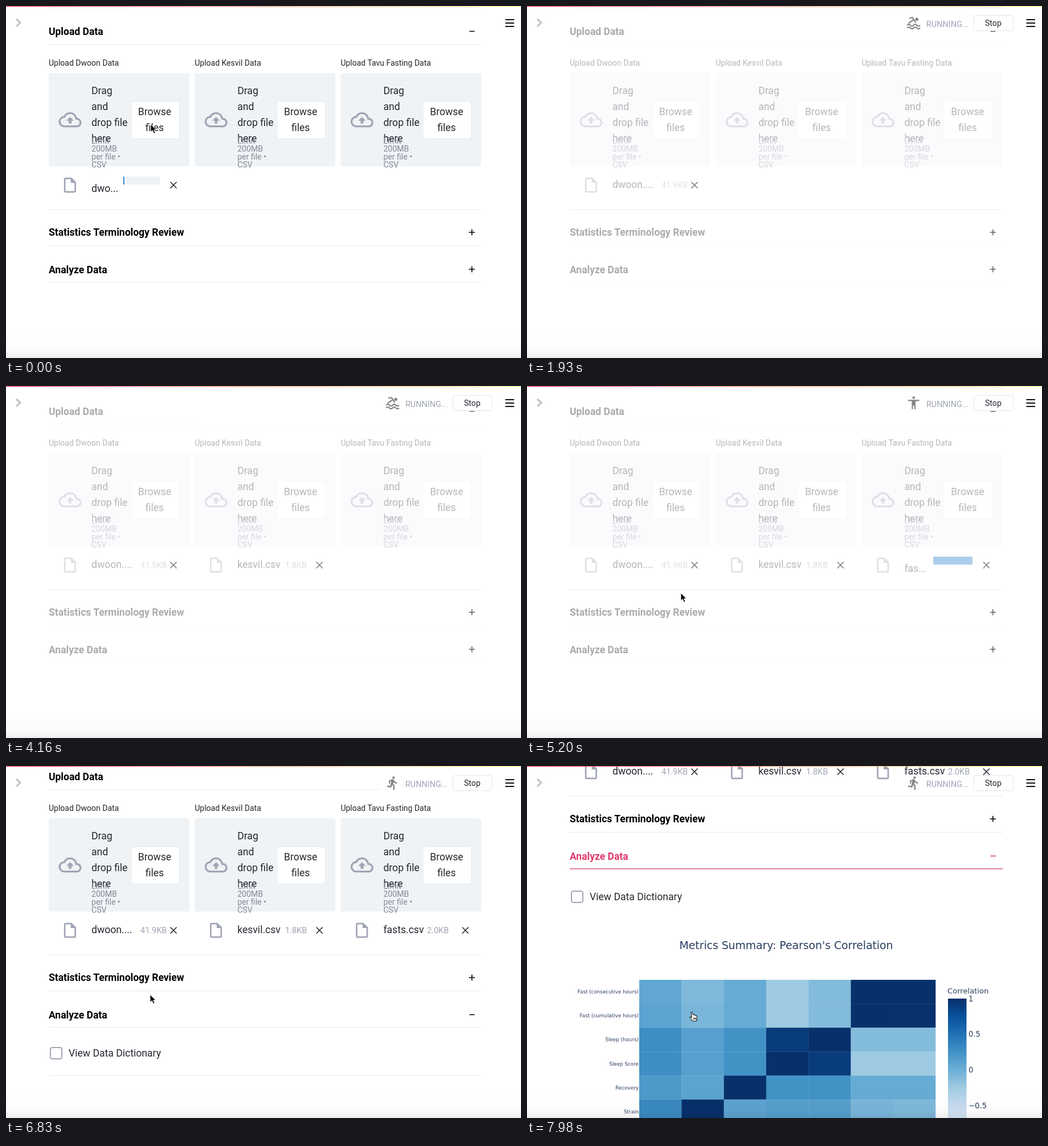
Write an HTML page that moves like this. It is 904x619 px and loops after 8 s.

```html
<!DOCTYPE html>
<html lang="en">
<head>
<meta charset="utf-8">
<title>Upload and analyze</title>
<style>
html, body { margin: 0; width: 100%; height: 100%; overflow: hidden; background: #fff; }
svg { display: block; width: 904px; height: 619px; }
text { font-family: Roboto, "Liberation Sans", sans-serif; white-space: pre; }
.plot text { font-family: "DejaVu Sans", sans-serif; fill: #2a3f5f; }
.line { fill: none; stroke: #e6e8ec; stroke-width: 1; }
.mark { fill: none; stroke: currentColor; stroke-width: 1.6; }

.stale { animation: stale 8s linear infinite; }
.dim { animation: dim 8s linear infinite; }
@keyframes stale {
  0% { opacity: 1 }
  9% { opacity: 1; animation-timing-function: ease-in }
  21.5%, 67.37% { opacity: .33 }
  67.38%, 100% { opacity: 1 }
}
@keyframes dim {
  0% { opacity: 1 }
  9% { opacity: 1; animation-timing-function: ease-in }
  21.5%, 67.37% { opacity: .6 }
  67.38%, 100% { opacity: 1 }
}

#page { animation: scroll 8s step-end infinite; }
@keyframes scroll {
  0% { transform: translateY(0) }
  83.1% { transform: translateY(-9px) }
  84.2% { transform: translateY(-19px) }
  85.3% { transform: translateY(-26px) }
  89% { transform: translateY(-34px) }
  90.2% { transform: translateY(-48px) }
  94.85% { transform: translateY(-57px) }
  97.35% { transform: translateY(-155px) }
  98.6% { transform: translateY(-245px) }
  99.7%, 100% { transform: translateY(-305px) }
}

/* hard on/off switches */
#busy0 { animation: busy0 8s step-end infinite; }
#done0 { animation: done0 8s step-end infinite; }
#busy1 { animation: busy1 8s step-end infinite; }
#done1 { animation: done1 8s step-end infinite; }
#row1 { animation: row1 8s step-end infinite; }
#busy2 { animation: busy2 8s step-end infinite; }
#done2 { animation: done2 8s step-end infinite; }
#row2 { animation: row2 8s step-end infinite; }
#status { animation: status 8s step-end infinite; }
#closed { animation: closed 8s step-end infinite; }
.open { animation: open 8s step-end infinite; }
#tail { animation: tail 8s step-end infinite; }
#plot { animation: plot 8s step-end infinite; }
#check { animation: check 8s step-end infinite; }
#analyze { animation: hover 8s step-end infinite; }
#glow { animation: glow 8s step-end infinite; }
@keyframes busy0 { 0% { visibility: visible } 1.24%, 100% { visibility: hidden } }
@keyframes done0 { 0% { visibility: hidden } 1.24%, 100% { visibility: visible } }
@keyframes row1 { 0% { opacity: 0 } 30.36%, 100% { opacity: 1 } }
@keyframes busy1 { 0% { visibility: visible } 37.35%, 100% { visibility: hidden } }
@keyframes done1 { 0% { visibility: hidden } 37.35%, 100% { visibility: visible } }
@keyframes row2 { 0% { opacity: 0 } 58%, 100% { opacity: 1 } }
@keyframes busy2 { 0% { visibility: visible } 66.1%, 100% { visibility: hidden } }
@keyframes done2 { 0% { visibility: hidden } 66.1%, 100% { visibility: visible } }
@keyframes status { 0% { visibility: hidden } 3.6% { visibility: visible } 72.2% { visibility: hidden } 77.1%, 100% { visibility: visible } }
@keyframes closed { 0% { visibility: visible } 80.7%, 100% { visibility: hidden } }
@keyframes open { 0% { visibility: hidden } 80.7%, 100% { visibility: visible } }
@keyframes tail { 0% { visibility: hidden } 80.7% { visibility: visible } 89%, 100% { visibility: hidden } }
@keyframes plot { 0% { visibility: hidden } 89%, 100% { visibility: visible } }
@keyframes check { 0% { transform: none } 89%, 100% { transform: translateY(4px) } }
@keyframes hover { 0% { color: #000 } 68.4% { color: #e23a6a } 80.7% { color: #000 } 91.3%, 100% { color: #e23a6a } }
@keyframes glow { 0% { opacity: 0 } 68.4% { opacity: 1 } 80.7% { opacity: 0 } 91.3%, 100% { opacity: 1 } }

#fill1, #fill2 { transform-box: fill-box; }
#fill1 { animation: fill1 8s linear infinite; }
#fill2 { animation: fill2 8s linear infinite; }
@keyframes fill1 { 0%, 30.3% { transform: scaleX(.03) } 33.9%, 100% { transform: none } }
@keyframes fill2 { 0%, 58% { transform: scaleX(.03) } 62%, 100% { transform: none } }

#cursor { animation: move 8s linear infinite, show 8s step-end infinite; }
@keyframes move {
  0%, 3.5% { transform: translate(254px, 208px) }
  6% { transform: translate(134px, 385px) }
  6.1%, 27.8% { transform: translate(473px, 226px) }
  34.9%, 36.1% { transform: translate(150px, 174px) }
  38.6% { transform: translate(11px, 118px) }
  41.1%, 42.2% { transform: translate(8px, 88px) }
  42.3%, 57% { transform: translate(640px, 236px) }
  59.2%, 61.5% { transform: translate(223px, 310px) }
  64.9%, 66.1% { transform: translate(270px, 364px) }
  68.4%, 78.3% { transform: translate(284px, 470px) }
  80.7% { transform: translate(272px, 436px) }
  85.3%, 89% { transform: translate(253px, 402px) }
  91.3%, 100% { transform: translate(285px, 432px) }
}
@keyframes show { 0% { opacity: 1 } 6% { opacity: 0 } 27.8% { opacity: 1 } 42.2% { opacity: 0 } 57%, 100% { opacity: 1 } }
#arrow { animation: arrow 8s step-end infinite; }
#beam { animation: beam 8s step-end infinite; }
#hand { animation: hand 8s step-end infinite; }
@keyframes arrow { 0% { visibility: visible } 33.6% { visibility: hidden } 36.3% { visibility: visible } 68.4% { visibility: hidden } 80.7% { visibility: visible } 91.3%, 100% { visibility: hidden } }
@keyframes beam { 0% { visibility: hidden } 33.6% { visibility: visible } 36.3%, 100% { visibility: hidden } }
@keyframes hand { 0% { visibility: hidden } 68.4% { visibility: visible } 80.7% { visibility: hidden } 91.3%, 100% { visibility: visible } }
</style>
</head>
<body>
<svg id="stage" viewBox="0 0 904 619"></svg>
<script>
const INK = '#262730', PALE = '#eff3f6', MUTED = '#a0a5b5', BODY = 17.6, STEP = 256.2;

// text placed by the middle of its capitals
const text = (x, y, str, size = BODY, fill = INK, more = '') =>
  `<text x="${x}" y="${y + size * .36}" font-size="${size}" fill="${fill}" ${more}>${str}</text>`;
const rect = (x, y, w, h, fill, more = '') =>
  `<rect x="${x}" y="${y}" width="${w}" height="${h}" fill="${fill}" ${more}/>`;
const rule = (y, more = 'class="line"') => `<path d="M75 ${y}H835" ${more}/>`;
const heading = (y, str, fill = '#000') => text(75, y, str, 17.5, fill, 'font-weight="600"');
const minus = y => `<path class="mark" d="M813.5 ${y}h9"/>`;
const plus = y => `<path class="mark" d="M812.5 ${y}h10.5M817.8 ${y - 5.3}v10.6"/>`;

const CLOUD = 'M19.35 10.04C18.67 6.59 15.64 4 12 4 9.11 4 6.6 5.64 5.35 8.04 2.34 8.36 0 10.91 0 14c0 3.31 2.69 6 6 6h13c2.76 0 5-2.24 5-5 0-2.64-2.05-4.78-4.65-4.96zM19 18H6c-2.21 0-4-1.79-4-4 0-2.05 1.53-3.76 3.56-3.97l1.07-.11.5-.95C8.08 7.14 9.94 6 12 6c2.62 0 4.88 1.86 5.39 4.43l.3 1.5 1.53.11c1.56.1 2.78 1.41 2.78 2.96 0 1.65-1.35 3-3 3zM8 13h2.55v3h2.9v-3H16l-4-4z';
const SHEET = 'M14 2H6c-1.1 0-2 .9-2 2v16c0 1.1.9 2 2 2h12c1.1 0 2-.9 2-2V8l-6-6zM6 20V4h7v5h5v11H6z';

const columns = [
  { label: 'Dwoon', short: 'dwo...', file: 'dwoon....', size: '41.9KB', sizeX: 236, bar: [206, 64], part: 1.5 },
  { label: 'Kesvil', short: 'kes...', file: 'kesvil.csv', size: '1.8KB', sizeX: 490, bar: [459, 56] },
  { label: 'Tavu Fasting', short: 'fas...', file: 'fasts.csv', size: '2.0KB', sizeX: 739, bar: [713, 69] }
];

function uploader(c, i) {
  const x = 75 + STEP * i, tx = x + 75, mid = x + 186;
  return text(x, 100, `Upload ${c.label} Data`, 14)
    + rect(x, 118, 247, 164, PALE, 'rx="4"')
    + `<path fill="${MUTED}" transform="translate(${x + 17.5} 180) scale(1.667)" d="${CLOUD}"/>`
    + ['Drag', 'and', 'drop file', 'here'].map((s, n) => text(tx, 149 + 28 * n, s)).join('')
    + ['Limit', '200MB', 'per file •', 'CSV'].map((s, n) => text(tx, 237 + 14 * n, s, 14.1, '#858896')).join('')
    + rect(x + 144.5, 168, 85, 65.5, '#fff', 'rx="4" stroke="#e6e9ef"')
    + text(mid, 186, 'Browse', BODY, INK, 'text-anchor="middle"')
    + text(mid, 214, 'files', BODY, INK, 'text-anchor="middle"');
}

function fileRow(c, i) {
  const x = 75 + STEP * i, [bx, bw] = c.bar, cx = x + 219;
  return `<g id="row${i}"><g class="stale">
    <path fill="${MUTED}" transform="translate(${x + 21.5} 299.2) scale(1.32)" d="${SHEET}"/>
    <g id="busy${i}">${text(x + 75, 321, c.short)}${rect(bx, 300, bw, 14, PALE, 'rx="2"')}
      ${rect(bx, 300, c.part || bw, 14, '#0068c9', `id="fill${i}" rx="${c.part ? 0 : 2}"`)}</g>
    <g id="done${i}">${text(x + 75, 314, c.file)}${text(c.sizeX, 315, c.size, 14.5, MUTED)}</g>
    </g><path class="mark dim" color="${INK}" d="M${cx - 5.5} 309.5l11 11m0-11l-11 11"/></g>`;
}

const blues = ['247,251,255', '222,235,247', '198,219,239', '158,202,225', '107,174,214',
  '66,146,198', '33,113,181', '8,81,156', '8,48,107'].map(s => s.split(',').map(Number));
function blue(z) {
  const p = (z + 1) * 4, i = Math.min(7, Math.floor(p));
  return `rgb(${blues[i].map((v, k) => Math.round(v + (blues[i + 1][k] - v) * (p - i)))})`;
}
const metrics = [
  ['Fast (consecutive hours)', .06, -.1, .03, -.25, -.12, 1, 1],
  ['Fast (cumulative hours)', .1, -.07, .03, -.25, -.12, 1, .99],
  ['Sleep (hours)', .28, .13, .25, .91, 1, -.12, -.12],
  ['Sleep Score', .28, .13, .25, 1, .91, -.25, -.25],
  ['Recovery', .18, .09, 1, .25, .25, .03, .03],
  ['Strain', .31, 1, .09, .13, .13, -.07, -.1]
];

function plot() {
  const w = 520 / 7, h = 42.1, top = 681;
  const rows = metrics.map(([name, ...zs], r) =>
    text(196, top + h * (r + .5), name, 8.78, '#2a3f5f', 'text-anchor="end"')
    + zs.map((z, c) => rect(197 + w * c, top + h * r, w + .3, h + .3, blue(z))).join('')).join('');
  const stops = blues.map((c, i) => `<stop offset="${1 - i / 8}" stop-color="rgb(${c})"/>`).reverse().join('');
  const ticks = ['1', '0.5', '0', '−0.5'].map((s, i) => text(775, 714 + 62.6 * i, s, 13.2)).join('');
  return `<g id="plot" class="plot">
    <linearGradient id="scale" x2="0" y2="1">${stops}</linearGradient>
    ${text(455, 620.5, "Metrics Summary: Pearson's Correlation", 18.8, '', 'text-anchor="middle"')}
    ${rows}${text(738, 700.5, 'Correlation', 13.1)}${rect(739, 714, 32.5, 250, 'url(#scale)')}${ticks}</g>`;
}

const stroke = 'fill="none" stroke="#858585" stroke-width="2"';
const figures = {
  run: '<path d="M13.49 5.48c1.1 0 2-.9 2-2s-.9-2-2-2-2 .9-2 2 .9 2 2 2zm-3.6 13.9l1-4.4 2.1 2v6h2v-7.5l-2.1-2 .6-3c1.3 1.5 3.3 2.5 5.5 2.5v-2c-1.9 0-3.5-1-4.3-2.4l-1-1.6c-.4-.6-1-1-1.7-1-.3 0-.5.1-.8.1l-5.2 2.2v4.7h2v-3.4l1.8-.7-1.6 8.1-4.9-1-.4 2 7 1.4z"/>',
  stand: '<path d="M12 1.5a2.1 2.1 0 1 1 0 4.2 2.1 2.1 0 0 1 0-4.2zM21 9h-6v13h-2v-6h-2v6H9V9H3V7h18z"/>',
  swim: `<circle cx="17" cy="6.3" r="2.5"/><path ${stroke} d="M5 4.5l5-1.2 5.5 8M4 12.5l7.5-5.5M1.5 15.5q2.6-2.8 5.2 0t5.2 0 5.2 0 5.2 0M1.5 20q2.6-2.8 5.2 0t5.2 0 5.2 0 5.2 0"/>`,
  skate: `<circle cx="16.5" cy="2.7" r="2.1"/><path ${stroke} d="M5.5 11.5l2-4h6l-3.5 7 6 3 .5 6M10 14l-5.5 7M13 8l2.5 4 4 1"/>`
};
const order = ['run', 'swim', 'skate', 'stand', 'swim', 'skate', 'run', 'stand', 'swim', 'skate', 'stand', 'swim'];

document.getElementById('stage').innerHTML = `
<g id="page">
  ${rule(3)}${rule(358)}
  <g class="stale">
    ${heading(44.5, 'Upload Data')}${rule(67.5)}
    ${columns.map(uploader).join('')}
    ${heading(398, 'Statistics Terminology Review')}${rule(421.5)}
  </g>
  <g class="dim">${minus(44.5)}${plus(398)}</g>
  ${columns.map(fileRow).join('')}
  <g id="analyze">
    <g class="stale">${heading(463.3, 'Analyze Data', 'currentColor')}${rule(485.5)}</g>
    ${rule(485.8, 'id="glow" stroke="#d8406e" stroke-width="1.2"')}
    <g class="dim"><g id="closed">${plus(463)}</g><g class="open">${minus(463.3)}</g></g>
  </g>
  <g class="open">
    <g id="check">${rect(78, 521, 20, 20, '#fff', `rx="3.5" stroke="${MUTED}" stroke-width="2"`)}
    ${text(110, 531, 'View Data Dictionary')}</g>
  </g>
  <g id="tail">${rule(570.5)}</g>
  ${plot()}
</g>
<linearGradient id="shade" x2="0" y2="1">
  <stop offset="0" stop-opacity="0"/><stop offset=".7" stop-opacity=".015"/><stop offset="1" stop-opacity=".07"/>
</linearGradient>
${rect(0, 575, 904, 44, 'url(#shade)')}
<linearGradient id="trim"><stop stop-color="#f63366"/><stop offset="1" stop-color="#fffd80"/></linearGradient>
${rect(0, 0, 904, 1.2, 'url(#trim)')}
<path d="M18 22.8l7 6.5-7 6.5" fill="none" stroke="#c4c4c4" stroke-width="3.2"/>
<path d="M876.5 24h15.5M876.5 30h15.5M876.5 36h15.5" stroke="#111" stroke-width="2"/>
<g id="status">
  ${rect(656, 16, 198, 28, '#fff')}
  <g id="figure" fill="#858585" transform="translate(665.5 16.6) scale(1.1)"></g>
  ${text(701, 31.5, 'RUNNING...', 14.4, MUTED)}
  ${rect(784.5, 16.5, 69, 27, '#fff', 'rx="4" stroke="#e3e6ec"')}
  ${text(804, 30, 'Stop', 14.1)}
</g>
<g id="cursor">
  <path id="arrow" d="M0 0V13.5L3.2 10.7 5.6 16.3 8 15.2 5.6 9.9H9.7Z" stroke="#fff" stroke-width=".9"/>
  <path id="beam" d="M-4-7q4 0 4 2 0-2 4-2M-4 7.5q4 0 4-2 0 2 4 2M0-5V5.5M-2 1h4" fill="none" stroke="#111" stroke-width="1.3"/>
  <path id="hand" d="M3 1.3Q4.3-.4 5.5 1.3L6.4 5.6Q7.7 4.7 8.6 6 10 5.3 10.8 6.7 12.8 6.3 13.2 8.3L13.6 12 12.3 16.5H6L1 11Q.4 9.2 2.3 9.4L4.2 10.6ZM7.3 10.5V14M9.3 10.5V14M11.3 10.5V14" fill="#fff" stroke="#111" stroke-width="1.1" stroke-linejoin="round"/>
</g>`;

const figure = document.getElementById('figure');
let start, shown;
function tick(now) {
  start ??= now;
  const t = (now - start) % 8000;
  // the figure starts afresh with the second run
  const n = t < 6000 ? Math.floor((t - 1265) / 187) + 1 : Math.floor((t - 6826) / 187);
  const name = order[(n % 12 + 12) % 12];
  if (name !== shown) figure.innerHTML = figures[shown = name];
  requestAnimationFrame(tick);
}
requestAnimationFrame(tick);
</script>
</body>
</html>
```
